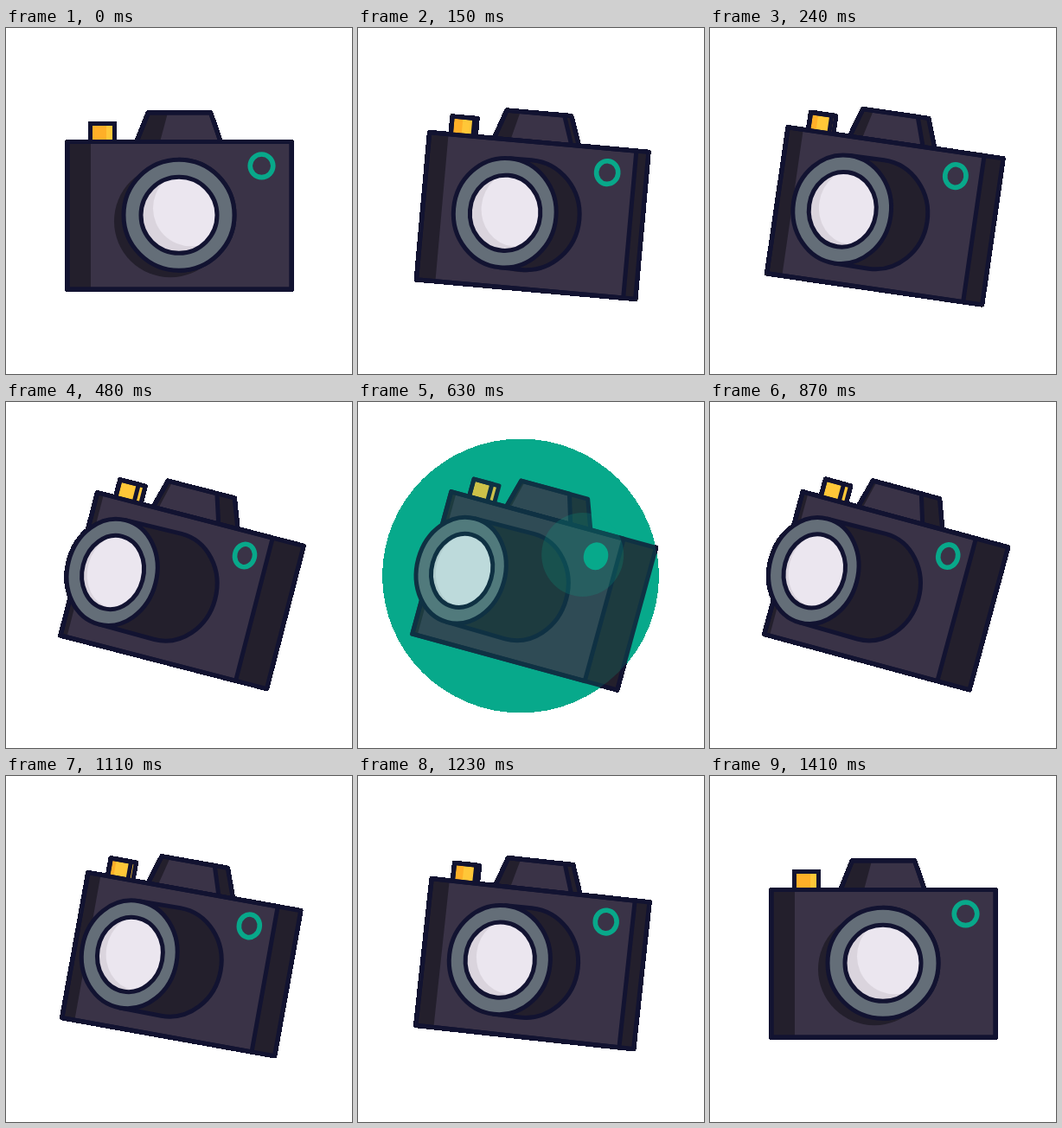
Animation of 400x400 px, one loop 2.97 s. Source, as an HTML page with a canvas:

```html
<!DOCTYPE html>
<html lang="en">
<head>
<meta charset="utf-8">
<title>Camera flash</title>
<style>
html, body { margin: 0; height: 100%; overflow: hidden; background: #fff; }
canvas { display: block; width: 100vw; height: 100vh; }
</style>
</head>
<body>
<canvas id="stage" width="400" height="400"></canvas>
<script>
const ctx = document.getElementById('stage').getContext('2d', { willReadFrequently: true });
const LOOP = 2970, MOVE = 1410, TURN = 585, STEP = 30;
const INK = '#121331', BODY = '#3a3347', DARK = '#231f2c', GRAY = '#646e78',
      LIGHT = '#ebe6ef', SHADE = '#dad4dd', YELLOW = '#ffc738', ORANGE = '#ffaf28',
      GREEN = '#08a88a';

const clamp = v => Math.max(0, Math.min(1, v));

// Fast start, soft landing; the way back mirrors the way out.
function turn(t) {
  const u = clamp(Math.min(t, MOVE - t) / TURN);
  return 1.2 * u + 0.6 * u * u - 0.8 * u * u * u;
}

function paint(path, fill, stroke, width = 5) {
  if (fill) { ctx.fillStyle = fill; ctx.fill(path); }
  if (stroke) { ctx.strokeStyle = stroke; ctx.lineWidth = width; ctx.stroke(path); }
}

function poly(...pts) {
  const path = new Path2D();
  pts.forEach(([x, y]) => path.lineTo(x, y));
  path.closePath();
  return path;
}

function oval(x, y, rx, ry = rx) {
  const path = new Path2D();
  path.ellipse(x, y, rx, ry, 0, 0, 2 * Math.PI);
  return path;
}

const box = (l, r, t, b) => poly([l, t], [r, t], [r, b], [l, b]);

function drawButton(p) {
  const l = -102.5 + 5 * p, r = -74.5 + 7 * p, mid = -74.5 - 1.3 * p;
  const top = -106.5, base = -85;
  paint(box(l, r, top, base), YELLOW);
  paint(box(l, -84 - 12 * p, top, base), ORANGE);
  paint(box(l, mid, top, base), null, INK);
  paint(box(l, r, top, base), null, INK);
}

function drawHump(p) {
  const top = -119, base = -85.5;
  const tl = [-35.5 - 8.7 * p, top], bl = [-49 - 4 * p, base];
  const tr = [36.5 - p, top], br = [48, base];
  const mt = [36.5 - 23 * p, top], mb = [48 - 24 * p, base];
  const all = poly(tl, tr, br, bl), front = poly(tl, mt, mb, bl);
  paint(all, DARK);
  paint(front, BODY);
  paint(poly(tl, [-13 - 27 * p, top], [-22 - 26 * p, base], bl), DARK);
  paint(front, null, INK);
  paint(all, null, INK);
}

function drawBody(p) {
  const l = -129 + 10 * p, r = 130 - 3.5 * p, edge = 130 - 42.3 * p;
  const top = -85.5, base = 85;
  paint(box(l, r, top, base), DARK);
  paint(box(l, edge, top, base), BODY);
  paint(box(l, -102 - 11 * p * p, top, base), DARK);
  paint(box(l, edge, top, base), null, INK);
  paint(box(l, r, top, base), null, INK);
}

function drawLens(p) {
  const y = -0.7, x = -84 * p, rx = 64 - 12.8 * p, ry = 64 - 2 * p;
  const bx = -14 * p, brx = 64 - 8 * p, bry = 64 - p;
  const k = clamp(1 - 2 * p);
  paint(oval(bx - 10 * k, y + 7 * k, brx + 1, bry + 1), DARK);

  const tube = new Path2D();
  tube.moveTo(x, y - ry);
  tube.lineTo(bx, y - bry);
  tube.ellipse(bx, y, brx, bry, 0, -Math.PI / 2, Math.PI / 2);
  tube.lineTo(x, y + ry);
  tube.closePath();
  paint(tube, DARK, INK);
  paint(oval(x, y, rx, ry), GRAY, INK);

  const gx = -83 * p, grx = 44 - 9 * p, gry = 44 - p;
  const glass = oval(gx, y, grx, gry);
  paint(glass, SHADE);
  ctx.save();
  ctx.clip(glass);
  paint(oval(gx + 14 - 9 * p * p, y - 8 + 6 * p, grx, gry), LIGHT);
  ctx.restore();
  paint(glass, null, INK);
}

// Gives the artwork a hard outer edge, without soft pixels.
function hardenEdge() {
  const img = ctx.getImageData(0, 0, 400, 400), d = img.data;
  for (let i = 3; i < d.length; i += 4) d[i] = d[i] > 20 ? 255 : 0;
  ctx.putImageData(img, 0, 0);
}

function draw(t) {
  const p = turn(t);
  const shift = p * (1.13 - 0.13 * p); // sideways parallax runs slightly ahead of the tilt
  const flash = clamp(Math.min((t - 540) / 90, (810 - t) / 90));
  ctx.clearRect(0, 0, 400, 400);
  ctx.lineJoin = 'round';

  const glow = oval(188, 201, 159.5, 158);
  if (flash) paint(glow, GREEN);

  ctx.save();
  ctx.translate(200, 217 + 0.5 * p);
  ctx.rotate(15.3 * p * Math.PI / 180);
  drawButton(shift);
  drawHump(shift);
  drawBody(shift);
  drawLens(shift);
  paint(oval(95.5 - 33.5 * shift, -57.7, 13.3 - 2 * shift, 13.3), flash ? GREEN : null, GREEN, 5.6);
  ctx.restore();

  if (flash) {
    ctx.globalAlpha = 0.2 * flash;
    paint(glow, GREEN);
    paint(oval(259.7, 176.5, 47.5, 48.5), GREEN);
    ctx.globalAlpha = 1;
  }
  hardenEdge();
}

const start = performance.now();
function tick() {
  const t = (performance.now() - start) % LOOP;
  draw(Math.floor(t / STEP) * STEP);
  requestAnimationFrame(tick);
}
tick();
</script>
</body>
</html>
```
